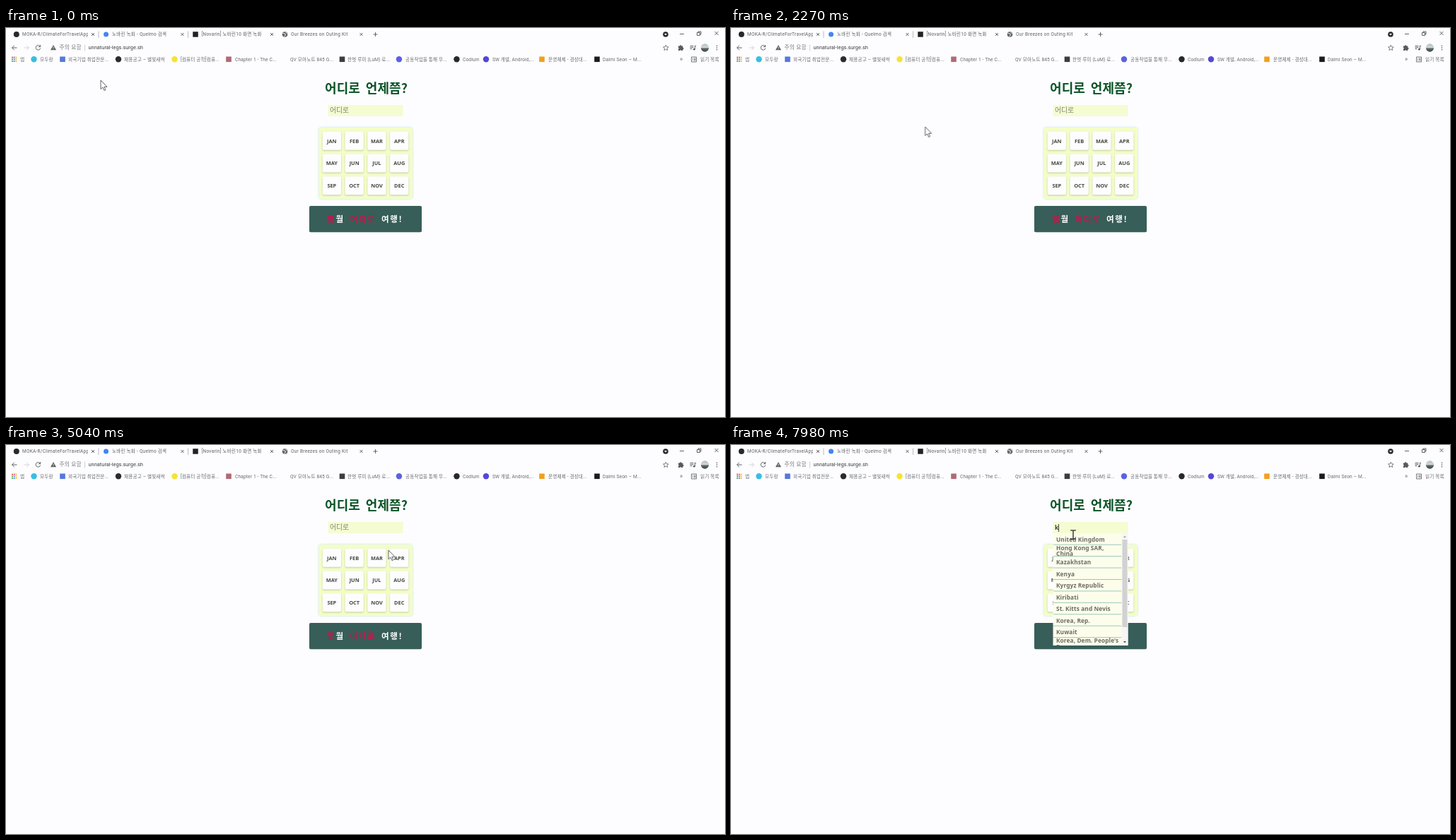
An HTML page for the animation above (8000 ms loop, 1017 by 551 pixels).

```html
<!DOCTYPE html>
<html lang="ko">
<head>
<meta charset="utf-8">
<title>어디로 언제쯤?</title>
<style>
html, body { margin: 0; width: 100%; height: 100%; overflow: hidden; background: #fdfdff; }
svg { display: block; width: 1017px; height: 551px; }
text { font-family: Roboto, "Noto Sans CJK KR", "Noto Sans CJK", sans-serif; white-space: pre; }
.tab { font-size: 6.45px; letter-spacing: .3px; fill: #5c5f64; }
.mark { font-size: 6.6px; letter-spacing: .15px; fill: #66696e; }
.line { fill: none; stroke: #505357; stroke-width: .9; }
.kr { font-family: "Noto Sans CJK KR", "Noto Sans CJK", sans-serif; }
.month { font: 600 7.4px "Noto Sans", sans-serif; fill: #47473f; text-anchor: middle; }
.item { font: 600 8.3px "Noto Sans", sans-serif; letter-spacing: .1px; fill: #6c6c63; }
.cell { fill: #fdfdff; filter: drop-shadow(0 1px 1px rgba(70, 90, 50, .3)); }
.panel { fill: #f4fdc9; filter: drop-shadow(0 .5px 1.5px rgba(90, 190, 150, .4)); }

#pointer, #beam, #caret, #hint, #typed, #list { animation: 8s linear infinite; }
#pointer { animation-name: roam; }
#beam { animation-name: hover; }
#caret { animation-name: blink; animation-timing-function: step-end; }
#hint { animation-name: leave; animation-timing-function: step-end; }
#typed { animation-name: type; animation-timing-function: step-end; }
#list { animation-name: open; animation-timing-function: step-end; }

@keyframes roam {
  0% { transform: translate(134px, 74px); opacity: 1; }
  11.75% { transform: translate(134px, 74px); animation-timing-function: cubic-bezier(.42, 0, .58, 1); }
  20.5% { transform: translate(110px, 108px); }
  24.625% { transform: translate(110px, 108px); animation-timing-function: cubic-bezier(.45, .1, .75, .75); }
  28.375% { transform: translate(274px, 140px); animation-timing-function: cubic-bezier(.2, .3, .5, 1); }
  34.625% { transform: translate(476px, 109px); }
  37.125% { transform: translate(478px, 111px); }
  38.375% { transform: translate(478px, 115px); animation-timing-function: step-end; }
  56.75% { transform: translate(985px, 335px); animation-timing-function: cubic-bezier(.35, .15, .4, 1); }
  66.25% { transform: translate(481px, 124px); opacity: 1; animation-timing-function: step-end; }
  66.251%, 100% { transform: translate(481px, 124px); opacity: 0; }
}
@keyframes hover {
  0% { transform: translate(484px, 132px); opacity: 0; animation-timing-function: step-end; }
  66.25% { transform: translate(484px, 132px); opacity: 1; }
  67.25% { transform: translate(484px, 132px); animation-timing-function: ease-out; }
  70.125%, 100% { transform: translate(484px, 127px); opacity: 1; }
}
@keyframes blink {
  0% { opacity: 0; }
  70.125% { opacity: 1; }
  76.875% { opacity: 0; }
  83.5% { opacity: 1; }
  90.125% { opacity: 0; transform: none; }
  93.875%, 100% { opacity: 1; transform: translateX(5px); }
}
@keyframes leave { 0% { opacity: 1; } 93.875%, 100% { opacity: 0; } }
@keyframes type { 0% { opacity: 0; } 93.875%, 100% { opacity: 1; } }
@keyframes open { 0% { opacity: 0; } 94.25%, 100% { opacity: 1; } }
</style>
</head>
<body>
<svg viewBox="0 0 1017 551">
  <defs>
    <linearGradient id="photo" x2="0" y2="1">
      <stop offset="0" stop-color="#aebdca"/>
      <stop offset=".45" stop-color="#d5d8d8"/>
      <stop offset=".6" stop-color="#5e6a6c"/>
      <stop offset="1" stop-color="#3c4446"/>
    </linearGradient>
    <clipPath id="firstTab"><rect x="20" y="0" width="96" height="18"/></clipPath>
    <clipPath id="listBox"><rect x="455" y="125" width="107" height="159"/></clipPath>
  </defs>

  <g id="tabs"></g>

  <!-- window controls -->
  <circle cx="933" cy="9" r="3.8" fill="#2b2d30"/>
  <path d="M931 8h4l-2 2.5z" fill="#fff"/>
  <path class="line" d="M953 8.5h6M977.5 6.5h4v4h-4zM979 6.5v-1.5h4v4h-1.5M1002.500 5l5 5m0-5l-5 5"/>

  <!-- toolbar -->
  <path class="line" d="M15.5 28h-7m3.3-3.3L8.5 28l3.3 3.3"/>
  <path class="line" d="M25.5 28h7m-3.3-3.3l3.3 3.3-3.3 3.3" style="stroke:#cfd0d4"/>
  <path class="line" d="M48 25.7a3.3 3.3 0 1 0 .7 2.8M48.7 24v2.6h-2.6"/>
  <path d="M67 24l4 7.2h-8z" fill="#5b5e62"/>
  <path d="M67 26.5v2.4m0 .7v.8" stroke="#fff" stroke-width=".8"/>
  <text x="75.5" y="30.4" font-size="7.7" letter-spacing=".25" fill="#75787c">주의 요함</text>
  <path d="M111.5 23.5v9" stroke="#c4c5c9" stroke-width=".8"/>
  <text x="116.5" y="30.3" font-size="7.45" fill="#3c3f43">unnatural-legs.surge.sh</text>
  <path class="line" d="M933.3 24.2l1.1 2.5 2.7.3-2 1.8.6 2.7-2.4-1.4-2.4 1.4.6-2.7-2-1.8 2.7-.3z" style="stroke-width:.75"/>
  <path d="M951 25.5h2a1.2 1.2 0 0 1 2.4 0h2v2.2a1.2 1.2 0 0 1 0 2.4v1.9h-2.2a1.1 1.1 0 0 0-2.1 0h-2.1v-2.2a1.1 1.1 0 0 0 0-2.1z" fill="#56595d"/>
  <path class="line" d="M967.5 25.5h5m-5 2h5m-5 2h3m4 .8v-5h1.7"/>
  <circle cx="973.3" cy="30.3" r="1.3" fill="#505357"/>
  <circle cx="988.5" cy="28" r="5.7" fill="url(#photo)"/>
  <g fill="#505357"><circle cx="1005.5" cy="25.2" r=".8"/><circle cx="1005.5" cy="28" r=".8"/><circle cx="1005.5" cy="30.8" r=".8"/></g>

  <g id="marks"></g>
  <text class="mark" x="953" y="47" style="font-size:9px">»</text>
  <path class="line" d="M969.5 41h7v7h-7zM971 43h1m1 0h2.5M971 44.5h1m1 0h2.5M971 46h1m1 0h2.5" style="stroke-width:.75"/>
  <text class="mark" x="982" y="46.6">읽기 목록</text>

  <!-- page -->
  <text class="kr" x="451" y="91.5" font-size="18" font-weight="700" letter-spacing=".1" word-spacing="2.6" fill="#0b5427">어디로 언제쯤?</text>
  <rect x="455.5" y="109" width="106" height="16" fill="#f5fcd2"/>
  <text id="hint" class="kr" x="458" y="120.3" font-size="9.8" fill="#7f8177">어디로</text>
  <text id="typed" x="458" y="120.3" style="font:600 8.5px 'Noto Sans',sans-serif" fill="#3f403a">k</text>
  <path id="caret" d="M458.5 112v11" stroke="#333" stroke-width=".9"/>

  <rect class="panel" x="442.5" y="141" width="132.5" height="101" rx="4"/>
  <g id="months"></g>

  <rect x="429" y="252" width="159" height="37.2" rx="2" fill="#375e59"/>
  <g font-size="11.6" font-weight="700" letter-spacing="1.6" fill="#fff">
    <text class="kr" x="454" y="275.3" fill="#c51649">몇</text>
    <text class="kr" x="466.5" y="275.3">월</text>
    <text class="kr" x="486.5" y="275.3" fill="#c51649">어디로</text>
    <text class="kr" x="531" y="275.3">여행!</text>
  </g>

  <g id="list" clip-path="url(#listBox)"></g>

  <path id="pointer" d="M0 0V12.5L2.9 10L5 14.6L6.9 13.7L4.9 9.3H9Z" fill="#fff" stroke="#45454a" stroke-width=".85" stroke-linejoin="round"/>
  <path id="beam" d="M-3.8-6.2h3L0-5.600l.8-.6h3M0-5.8V5.8M-3.8 6.2h3L0 5.6l.8.6h3" fill="none" stroke="#222" stroke-width="1.3"/>
</svg>
<script>
const put = (id, html) => { document.getElementById(id).innerHTML = html; };
const dot = (x, y, r, c) => `<circle cx="${x}" cy="${y}" r="${r}" fill="${c}"/>`;
const box = (x, y, s, c) => `<rect x="${x - s / 2}" y="${y - s / 2}" width="${s}" height="${s}" fill="${c}"/>`;
const label = (cls, x, y, s) => `<text class="${cls}" x="${x}" y="${y}">${s}</text>`;

// tab strip
const globe = dot(394.5, 9, 3.8, '#5d6166') +
  '<path d="M391.5 7.5l3 .5 1 2-2 2.2M395.5 6l2 1.8" fill="none" stroke="#fff" stroke-width="1"/>';
const closers = [123, 249.5, 376, 502.5]
  .map(x => `<path class="line" d="M${x - 2} 7l4 4m0-4l-4 4"/>`).join('');
const rules = [131, 257.5]
  .map(x => `<path d="M${x} 4.5v9.5" stroke="#a9abb0" stroke-width=".8"/>`).join('');
put('tabs',
  dot(14.8, 9, 4, '#24292e') + dot(141.5, 9, 3.5, '#4285f4') + box(268, 9, 7.5, '#222') + globe +
  '<g clip-path="url(#firstTab)">' + label('tab', 23, 11.3, 'MOKA-R/ClimateForTravelApp: ma') + '</g>' +
  label('tab', 150, 11.3, '노바린 녹화 - Quelmo 검색') +
  label('tab', 276.5, 11.3, '[Novarin] 노바린10 화면 녹화') +
  label('tab', 403, 11.3, 'Our Breezes on Outing Kit') +
  closers + rules +
  '<path class="line" d="M519.5 9h6m-3-3v6"/>');

// bookmarks: text x, text, icon x, icon shape, icon colour
const marks = [
  [48, '모두랑', 39.5, dot, '#38bfe0'],
  [88, '외국기업 취업전문...', 80, box, '#5577dc'],
  [167, '채용공고 – 별빛새싹', 159, dot, '#2b2b2d'],
  [247, '[컴퓨터 공학]컴퓨...', 238.5, dot, '#f8e232'],
  [324, 'Chapter 1 - The C...', 315, box, '#b06a76'],
  [402, 'QV 모아노트 845 G...'],
  [483, '한벗 루미 (LuM) 로...', 475.5, box, '#3a3c40'],
  [565, '공동작업을 통해 무...', 556, dot, '#5a62e0'],
  [646, 'Codlum', 637.5, dot, '#24292e'],
  [688, 'SW 개발, Android,...', 679, dot, '#5148d8'],
  [767, '운영체제 - 경성대...', 758, box, '#f0a01e'],
  [844, 'Dalmi Seon – M...', 836, box, '#1b1b1d'],
];
const hues = ['#e0483c', '#e0483c', '#efb52c', '#3f9c57', '#4a80e0', '#efb52c', '#3f9c57', '#4a80e0', '#efb52c'];
put('marks',
  hues.map((c, i) => box(9 + i % 3 * 2.7, 41.6 + Math.floor(i / 3) * 2.7, 1.8, c)).join('') +
  label('mark', 20, 46.6, '앱') +
  marks.map(([x, s, ix, icon, c]) =>
    (icon ? icon(ix, 44.3, icon === dot ? 4.2 : 7.6, c) : '') + label('mark', x, 46.6, s)).join(''));

// month grid
put('months', 'JAN FEB MAR APR MAY JUN JUL AUG SEP OCT NOV DEC'.split(' ').map((m, i) => {
  const x = 447.7 + i % 4 * 31.8, y = 146.7 + Math.floor(i / 4) * 31.8;
  return `<rect class="cell" x="${x}" y="${y}" width="26.3" height="26" rx="2"/>` +
    label('month', x + 13.15, y + 15.9, m);
}).join(''));

// suggestions
const names = ['United Kingdom', 'Hong Kong SAR,|China', 'Kazakhstan', 'Kenya', 'Kyrgyz Republic', 'Kiribati',
  'St. Kitts and Nevis', 'Korea, Rep.', 'Kuwait', "Korea, Dem. People's|Rep."];
put('list',
  '<rect x="455.5" y="125" width="106" height="159" fill="#fdfdec"/>' +
  names.map((n, i) => {
    const y = 136.6 + i * 16.43, rows = n.split('|');
    return rows.map((r, k) => label('item', 460, y + (rows.length > 1 ? k * 8.2 - 4 : 0), r)).join('') +
      `<path d="M456 ${y + 4.6}H552.5" stroke="#8fc3b4" stroke-width=".9"/>`;
  }).join('') +
  '<rect x="552.5" y="125" width="9" height="159" fill="#f6f6f6"/>' +
  '<rect x="553.5" y="134" width="7" height="124" fill="#d2d2d2"/>' +
  '<path d="M555 131h4l-2-2.3z" fill="#9a9a9a"/><path d="M555 278h4l-2 2.3z" fill="#444"/>');
</script>
</body>
</html>
```
